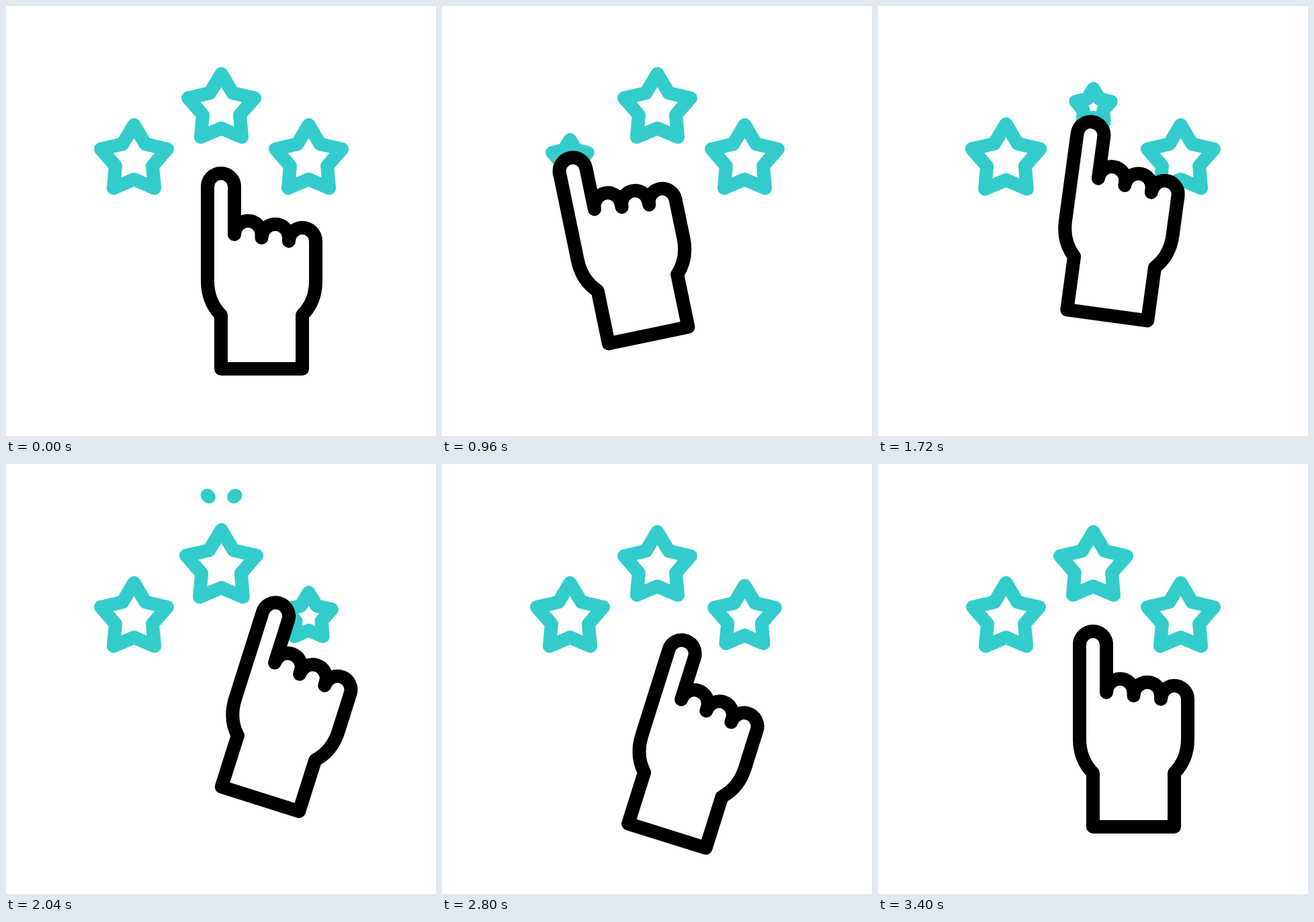
These frames come from a looping animation (640 by 640 pixels, 3600 ms). An HTML page:

```html
<!DOCTYPE html>
<html lang="en">
<head>
<meta charset="utf-8">
<title>Rating</title>
<style>
  html, body { margin: 0; width: 100%; height: 100%; overflow: hidden; background: #fff; }
  svg { display: block; width: 100%; height: 100%; }
  path { stroke-width: 20; stroke-linecap: round; stroke-linejoin: round; }
  #stars path { fill: none; stroke: #33cccc; }
  #hand { fill: #fff; stroke: #000; }
</style>
</head>
<body>
<svg viewBox="0 0 640 640">
  <g id="stars"></g>
  <path id="hand"/>
</svg>
<script>
const LOOP = 3600;
const SMALL = 0.53;
const BIG = 1.12;
const PRESS = 8.8;
const hand = document.getElementById('hand');
const layer = document.getElementById('stars');

const mix = (a, b, p) => a + (b - a) * p;
const ease = (t, from, to) => {
  const u = Math.min(1, Math.max(0, (t - from) / (to - from)));
  return u * u * (3 - 2 * u);
};
const addPath = () =>
  layer.appendChild(document.createElementNS('http://www.w3.org/2000/svg', 'path'));

// Sparks run [x1, y1, x2, y2], relative to the star's centre.
const sideSparks = dir => [
  [37 * dir, -74, 37 * dir, -107],
  [65.5 * dir, -48, 95 * dir, -48]
];
const topSparks = [-1, 1].map(dir => [18.5 * dir, -99, 40 * dir, -120.5]);

const stars = [
  { x: 190.5, y: 224, start: 200, sparks: sideSparks(-1) },
  { x: 320.5, y: 148, start: 1000, sparks: topSparks },
  { x: 450.5, y: 224, start: 1800, sparks: sideSparks(1) }
];
for (const star of stars) {
  star.path = addPath();
  star.lines = star.sparks.map(addPath);
}

// Hand poses, placed by the outstretched fingertip; bend curves the way there.
const moves = [
  { from: 0, to: 0, x: 320, y: 269, turn: 0, bend: 0 },
  { from: 200, to: 600, x: 193, y: 237, turn: -11.7, bend: 0 },
  { from: 1010, to: 1410, x: 317.6, y: 183.6, turn: 7.7, bend: -15 },
  { from: 1790, to: 2190, x: 441, y: 241.5, turn: 22, bend: -3 },
  { from: 2560, to: 2980, x: 305.5, y: 297, turn: 14.5, bend: 3 },
  { from: 2980, to: 3400, x: 320, y: 269, turn: 0, bend: 0 }
];

function starPath(cx, cy, scale) {
  const points = Array.from({ length: 10 }, (_, i) => {
    const radius = i % 2 ? 29 : 52;
    const angle = i * Math.PI / 5;
    const x = cx + scale * radius * Math.sin(angle);
    const y = cy + scale * (5 - radius * Math.cos(angle));
    return x.toFixed(2) + ' ' + y.toFixed(2);
  });
  return 'M' + points.join('L') + 'Z';
}

const handPath = tip =>
  `M0 191V271H121V191C134 178 141 160 141 140V81A20 20 0 0 0 101 81
   V76A20.25 20.25 0 0 0 60.5 76V71A20.25 20.25 0 0 0 20 71
   V${tip}A20 20 0 0 0 -20 ${tip}V140C-20 160 -13 178 0 191Z`;

function drawStar(star, t) {
  const s = star.start;
  const settled = Math.min(s + 1720, 3400);
  let scale = mix(1, SMALL, ease(t, s, s + 400));
  scale = mix(scale, BIG, ease(t, s + 880, s + 1080));
  scale = mix(scale, 1, ease(t, s + 1080, settled));
  star.path.setAttribute('d', starPath(star.x, star.y, scale));

  const head = ease(t, s + 1000, s + 1200);
  const tail = ease(t, s + 1200, s + 1400);
  star.lines.forEach((line, i) => {
    const [x1, y1, x2, y2] = star.sparks[i];
    const at = p => `${star.x + mix(x1, x2, p)} ${star.y + mix(y1, y2, p)}`;
    line.setAttribute('d', head > 0.01 && tail < 1 ? `M${at(tail)}L${at(head)}` : '');
  });
}

// The finger draws in while it holds a star down.
const pressAt = (t, s) => ease(t, s + 240, s + 640) - ease(t, s + 840, s + 1240);

function drawHand(t) {
  let i = moves.length - 1;
  while (i > 1 && t < moves[i].from) i--;
  const a = moves[i - 1], b = moves[i];
  const p = ease(t, b.from, b.to);
  const x = mix(a.x, b.x, p);
  const y = mix(a.y, b.y, p) + 2 * p * (1 - p) * b.bend;
  const press = stars.reduce((sum, star) => sum + pressAt(t, star.start), 0);
  hand.setAttribute('d', handPath(PRESS * press));
  hand.setAttribute('transform', `translate(${x} ${y}) rotate(${mix(a.turn, b.turn, p)})`);
}

const began = performance.now();
function render() {
  const t = (performance.now() - began) % LOOP;
  stars.forEach(star => drawStar(star, t));
  drawHand(t);
  requestAnimationFrame(render);
}
render();
</script>
</body>
</html>
```
